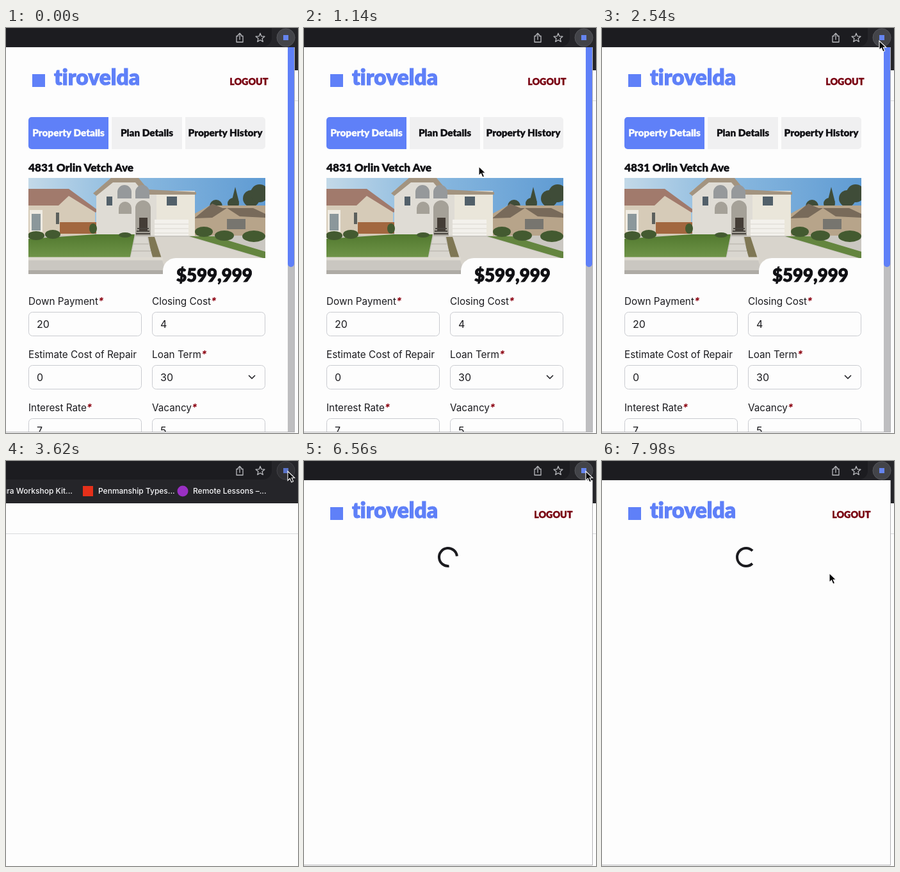
Recreate the animation shown at these times as an HTML page. Size 456 px wide and 632 px high, loop 8 s.

```html
<!DOCTYPE html>
<html lang="en">
<head>
<meta charset="utf-8">
<title>Property popup</title>
<style>
  html, body { margin: 0; width: 100%; height: 100%; overflow: hidden; background: #fdfdfd; }
  svg { display: block; width: 456px; height: 632px; }
  text { font-family: Inter, "Open Sans", sans-serif; font-size: 15.3px; fill: #1b1b1f; font-variant-ligatures: none; }
  .heavy { font-family: Lato, sans-serif; font-weight: 900; font-size: 15.3px; fill: #101014; stroke: #101014; stroke-width: .35; }
  .brand { font-size: 33.5px; fill: #5f80f8; stroke: #5f80f8; stroke-width: 1; }
  .logout { font-size: 14.3px; fill: #780010; stroke: #780010; text-anchor: end; }
  .mid { text-anchor: middle; }
  .chosen { fill: #fdfdfd; stroke: #fdfdfd; }
  .bookmark { font-size: 12px; font-weight: 500; fill: #f7f7f9; }
  .value { font-size: 16px; }
  .star { fill: #8c0010; font-weight: 700; font-style: italic; }
  .field { fill: #fdfdfd; stroke: #c9cbd0; }
  .icon { fill: none; stroke: #b8b9bd; stroke-width: 1.3; stroke-linejoin: round; stroke-linecap: round; }
</style>
</head>
<body>
<svg viewBox="0 0 456 632">
  <defs>
    <linearGradient id="sky" x2="1">
      <stop offset="0" stop-color="#c3d9e8"/><stop offset=".4" stop-color="#8dbbe0"/><stop offset="1" stop-color="#5f9bd3"/>
    </linearGradient>
    <linearGradient id="grass" x2="0" y2="1">
      <stop offset="0" stop-color="#52792f"/><stop offset="1" stop-color="#71964a"/>
    </linearGradient>
    <clipPath id="photoClip"><rect x="35" y="234" width="370" height="150"/></clipPath>
    <clipPath id="tabsClip"><rect x="35" y="139" width="370" height="50" rx="5"/></clipPath>
    <clipPath id="popupClip"><rect y="30" width="450" height="600"/></clipPath>
  </defs>

  <rect width="456" height="632" fill="#fdfdfd"/>
  <rect width="456" height="66" fill="#252529"/>
  <path d="M0 0H415V15A14 14 0 0 1 401 29H0Z" fill="#1c1c20"/>
  <path d="M0 113.5H456" stroke="#d9dadd"/>
  <g class="icon">
    <path d="M362.5 12.5H360V22H370V12.5H367.5M365 18V8.5M362.3 11L365 8.3L367.7 11"/>
    <path id="bookmarkStar"/>
  </g>
  <circle id="badge" cx="437" cy="15" r="14"/>
  <rect id="badgeMark" x="433" y="11" width="8" height="8" fill="#6584ee"/>
  <text class="bookmark" x="104" y="51" text-anchor="end">Nura Workshop Kit...</text>
  <rect x="120" y="39" width="16" height="16" fill="#e5301a"/>
  <text class="bookmark" x="144" y="51">Penmanship Types...</text>
  <circle cx="276" cy="47" r="8.5" fill="#9a30c4"/>
  <text class="bookmark" x="292" y="51">Remote Lessons –...</text>

  <g id="popup">
    <path d="M0 30H451V631H0Z" fill="#b2b2b5"/>
    <path d="M0 30H450V630H0Z" fill="#fdfdfd"/>
    <rect x="41" y="72" width="20" height="20" fill="#5f80f8"/>
    <text class="heavy brand" x="75" y="89">tirovelda</text>
    <text id="logout" class="heavy logout" y="89">LOGOUT</text>

    <g id="spinner" fill="none" stroke="#1b1b1f" stroke-width="4">
      <path d="M9.9 9.9A14 14 0 1 1 9.9 -9.9"/>
    </g>

    <g id="details" clip-path="url(#popupClip)">
      <rect x="440" y="30" width="10" height="600" fill="#bebec0"/>
      <path d="M440 30H450V368A5 5 0 0 1 440 368Z" fill="#5f80f8"/>
      <g id="tabs" clip-path="url(#tabsClip)"></g>
      <text class="heavy" x="35" y="224" style="font-size:17.2px">4831 Orlin Vetch Ave</text>

      <g clip-path="url(#photoClip)">
        <rect x="35" y="234" width="370" height="150" fill="url(#sky)"/>
        <g fill="#3f4c38">
          <circle cx="383" cy="266" r="13"/><circle cx="396" cy="258" r="14"/>
          <circle cx="355" cy="274" r="9"/><circle cx="328" cy="278" r="10"/>
          <path d="M352 272L358 248L364 272Z"/>
        </g>
        <path d="M35 272L60 270L100 258L139 287V324H35Z" fill="#d6cbb8"/>
        <path d="M35 251H98L143 284L140 288L98 262L82 277H35Z" fill="#a17a6c"/>
        <path d="M37 284H57V318H37Z" fill="#efebe2"/><path d="M40 290H54V316H40Z" fill="#8b979b"/>
        <path d="M78 288H83V306H78Z" fill="#5c605d"/>
        <path d="M84 303H142V321H84Z" fill="#a2673f"/>

        <path d="M292 291L318 277H405V330H292Z" fill="#b7a48a"/>
        <path d="M294 297L322 274L338 281H386L405 290V296L365 294L345 281L322 296Z" fill="#786a5a"/>
        <path d="M345 298H374V314H345Z" fill="#77756f"/>

        <path d="M141 253L160 240H203L221 254H295V325H141Z" fill="#dfdcd5"/>
        <path d="M235 260H295V325H235Z" fill="#eae6da"/>
        <path d="M136 258L164 234H207L222 252L297 256V260H218L202 241H167L141 262Z" fill="#a39480"/>
        <path d="M174 266V256A10 10 0 0 1 196 256V266ZM202 266V256A10 10 0 0 1 224 256V266Z" fill="#96999b"/>
        <path d="M176 290V281A9 9 0 0 1 196 281V290ZM202 325V281A12 12 0 0 1 226 281V325Z" fill="#a5a198"/>
        <path d="M208 296H221V316H208Z" fill="#443d36"/>
        <path d="M157 263H166V277H157ZM251 263H267V277H251Z" fill="#52606a"/>
        <path d="M205 313H223M204 317H224M203 321H225" stroke="#4a4640" stroke-width="2"/>
        <path d="M232 299H285V326H232Z" fill="#f3f1ec"/>
        <path d="M232 306H285M232 313H285M232 320H285" stroke="#dad7d0"/>

        <path d="M35 324H405V384H35Z" fill="#cac7c1"/>
        <path d="M35 329L140 322H201L193 361H35Z" fill="url(#grass)"/>
        <path d="M222 326H236L246 358H228Z" fill="#7f7754"/>
        <path d="M286 325H325L405 349V360Z" fill="#64853f"/>
        <path d="M232 326H286L405 361V384H251Z" fill="#d8d4cc"/>
        <path d="M202 326H220L230 361H194Z" fill="#d9d6cf"/>
        <path d="M198 337H223M196 348H226" stroke="#b2aea5"/>
        <path d="M35 360H245" stroke="#dedad1" stroke-width="5"/>
        <path d="M35 378H260V384H35Z" fill="#aeaba5"/>
        <g fill="#435a30">
          <ellipse cx="47" cy="324" rx="13" ry="7"/><ellipse cx="73" cy="322" rx="12" ry="7"/>
          <ellipse cx="136" cy="313" rx="6" ry="8"/><ellipse cx="186" cy="323" rx="10" ry="4"/>
          <ellipse cx="309" cy="318" rx="14" ry="8"/><ellipse cx="341" cy="324" rx="15" ry="8"/>
          <ellipse cx="387" cy="325" rx="18" ry="9"/>
        </g>
      </g>
      <path d="M245 385V379A20 20 0 0 1 265 359H406V385Z" fill="#fdfdfd"/>
      <text class="heavy" x="266" y="396" style="font-size:27.6px;stroke-width:.8">$599,999</text>
      <g id="form"></g>
      <path d="M379.5 542.5L384 547L388.5 542.5" class="icon" style="stroke:#26272b;stroke-width:1.7"/>
    </g>
  </g>

  <path id="cursor" d="M0 0V14.5L3.4 11.3L5.8 17L8.6 15.8L6.2 10.3H10.7Z" fill="#060608" stroke="#fdfdfd" stroke-width="1.1"/>
</svg>
<script>
const LOOP = 8000, CLOSE = 2900, PRESS = 5050, OPEN = 6480, SPIN = 750;
const $ = id => document.getElementById(id);

// time, x, y of the pointer tip
const PATH = [
  [350, 300, 640], [950, 273, 216], [1200, 273, 216], [2540, 433, 20],
  [2750, 440, 16], [6850, 440, 16], [7400, 403, 92], [7980, 355, 175]
];

$('bookmarkStar').setAttribute('d', 'M' + Array.from({ length: 10 }, (_, i) => {
  const r = i % 2 ? 3.2 : 7.3, a = i * Math.PI / 5 - Math.PI / 2;
  return `${397 + r * Math.cos(a)} ${15.5 + r * Math.sin(a)}`;
}).join('L') + 'Z');

$('tabs').innerHTML = [
  ['Property Details', 35, 125, '#5f80f8', 'chosen'],
  ['Plan Details', 165, 110, '#f0f0f1', ''],
  ['Property History', 280, 125, '#f0f0f1', '']
].map(([label, x, w, fill, state]) =>
  `<rect x="${x}" y="139" width="${w}" height="50" fill="${fill}"/>
   <text class="heavy mid ${state}" x="${x + w / 2}" y="169">${label}</text>`).join('');

$('form').innerHTML = [
  ['Down Payment', 20, 1], ['Closing Cost', 4, 1],
  ['Estimate Cost of Repair', 0, 0], ['Loan Term', 30, 1],
  ['Interest Rate', 7, 1], ['Vacancy', 5, 1]
].map(([label, value, required], i) => {
  const x = 35 + i % 2 * 193, y = 443 + (i >> 1) * 83;
  return `<text x="${x}" y="${y - 11}">${label}${required ? '<tspan class="star">*</tspan>' : ''}</text>
    <rect class="field" x="${x + .5}" y="${y + .5}" width="176" height="37" rx="6"/>
    <text class="value" x="${x + 13}" y="${y + 25}">${value}</text>`;
}).join('');

function pointer(t) {
  const i = PATH.findIndex(p => p[0] > t);
  if (i === 0) return PATH[0].slice(1);
  if (i < 0) return PATH[PATH.length - 1].slice(1);
  const [a, b] = [PATH[i - 1], PATH[i]];
  const k = (t - a[0]) / (b[0] - a[0]);
  const e = k * k * (3 - 2 * k);
  return [a[1] + (b[1] - a[1]) * e, a[2] + (b[2] - a[2]) * e];
}

const show = (id, on) => $(id).setAttribute('display', on ? 'inline' : 'none');

function render(t) {
  const first = t < CLOSE, loading = t >= OPEN, lit = first || t >= PRESS;
  show('popup', first || loading);
  show('details', first);
  show('spinner', loading);
  $('logout').setAttribute('x', first ? 409.5 : 419.5);
  $('badge').setAttribute('fill', lit ? '#434449' : '#303034');
  $('badge').setAttribute('stroke', lit ? '#55565b' : '#424247');
  $('badgeMark').setAttribute('opacity', lit ? 1 : .8);
  $('spinner').setAttribute('transform', `translate(225 150) rotate(${(t - OPEN) / SPIN * 360})`);
  $('cursor').setAttribute('transform', `translate(${pointer(t)})`);
}

const start = performance.now();
function tick() {
  render((performance.now() - start) % LOOP);
  requestAnimationFrame(tick);
}
tick();
</script>
</body>
</html>
```
